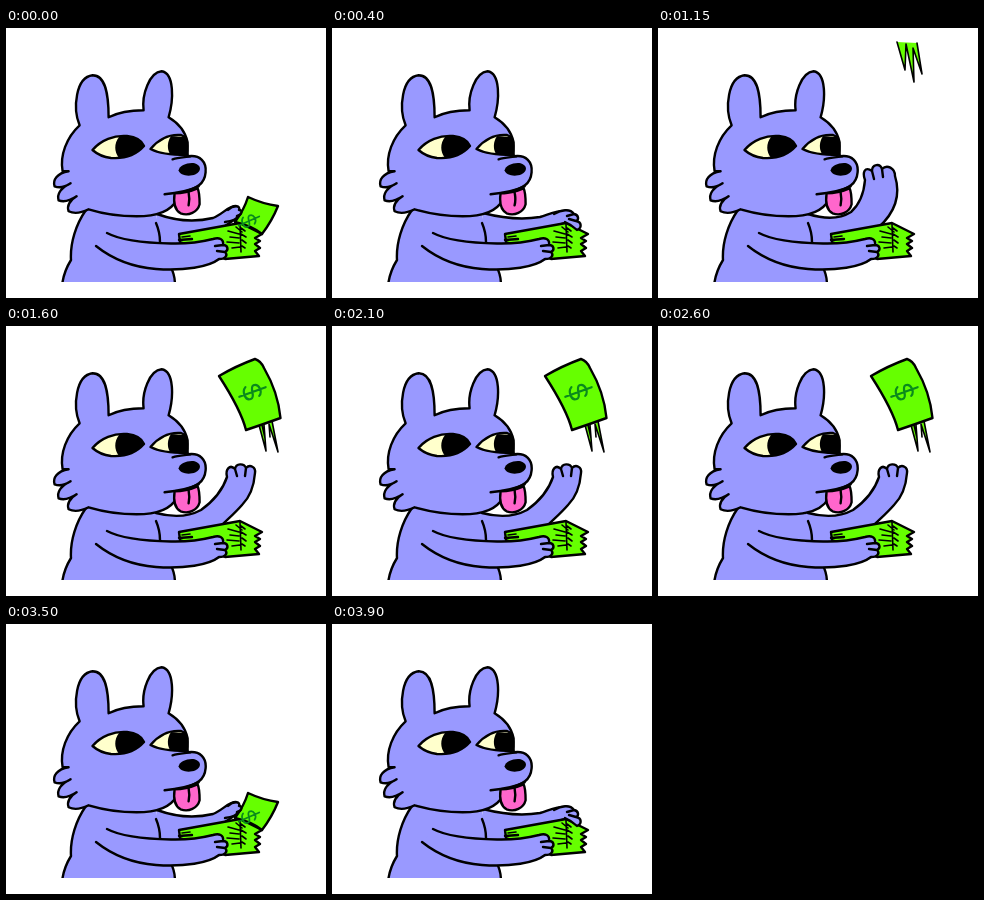
These frames come from a looping animation (320 by 270 pixels, 4 s). An HTML page:

```html
<!DOCTYPE html>
<html lang="en">
<head>
<meta charset="utf-8">
<title>Counting cash</title>
<style>
  html, body { margin: 0; width: 100%; height: 100%; overflow: hidden; background: #fff; }
  svg { display: block; width: 100vw; height: 100vh; }
  path { stroke: #000; stroke-width: 2.4; stroke-linecap: round; stroke-linejoin: round; fill: none; }
  .skin { fill: #99f; }
  .cash { fill: #6f0; }
  .eye { fill: #ffc; }
  .ink { fill: #000; }
  .bare { stroke: none; }
  .thin { stroke-width: 1.6; }
  .white { fill: #fff; }
  .sign { stroke: #0a8a1c; stroke-width: 2.2; }
</style>
</head>
<body>
<svg viewBox="0 0 320 270">
  <defs>
    <clipPath id="stage"><rect width="320" height="254"/></clipPath>
    <path id="dollar" class="sign" d="M6,-5C3,-10 -6,-9 -6,-3C-5,2 6,-2 6,4C6,10 -4,10 -7,5M0,-14L0,14"/>
  </defs>
  <g clip-path="url(#stage)">
    <!-- body -->
    <path class="skin bare" d="M80,182C70,196 64,215 65,232C60,240 57,248 56,258L169,258L165,236L154,214L150,184Z"/>
    <path d="M80,182C70,196 64,215 65,232C60,240 57,248 56,258M165,240C168,245 169,250 169,258"/>
    <!-- far arm -->
    <path id="armFill" class="skin bare"/>
    <path id="arm"/>
    <path d="M150,195C153,202 154,208 154,214"/>
    <path id="streaks" class="skin thin"/>
    <!-- head -->
    <g transform="translate(.6,.3)">
      <path class="skin" d="M73,97C66,80 69,49 86,47C99,47 102,66 102,89C112,84 125,82 137,82C135,66 143,44 155,43C168,45 167,72 162,89C172,95 179,104 181,114L181,128C194,126 200,134 199,144C198,156 190,160 176,164L170,172C165,181 155,188 130,188C110,188 95,185 82,181C76,184 68,186 62,183C60,178 63,172 70,168C64,172 57,174 52,172C50,165 56,159 64,155C58,159 53,160 48,158C46,152 50,145 62,143L56,143C53,127 60,109 73,97Z"/>
      <path d="M158,166C168,165 181,163 192,158M166,131C172,129 178,129 184,128"/>
      <path style="fill:#f6c" d="M168,165C167,172 167,181 174,185C182,188 191,184 193,176C193,170 193,164 191,160C184,163 176,165 168,165Z"/>
      <path d="M182,164C183,169 183,173 182,177"/>
      <path class="ink bare" d="M172,142C173,137 181,134 188,135C195,137 195,143 189,146C182,149 173,147 172,142Z"/>
    </g>
    <g id="open">
      <path class="eye" d="M86.5,122C95,112 108,107 121,108C130,109 136,113 138,118C130,127 118,131 105,130C97,129 91,126 86.5,122Z"/>
      <path class="ink bare" d="M113,109C108,115 108,124 113,130C123,129 132,125 138,118C134,110 123,107 113,109Z"/>
      <path class="eye" d="M144.5,121C152,112 163,106 175,107L179,109C182,116 182,122 180,127C167,127 154,126 144.5,121Z"/>
      <path class="ink bare" d="M165,108C161,114 161,121 164,126L180,127C182,121 182,115 179,109Z"/>
    </g>
    <path id="shut" d="M87,122C91,126 97,129 105,130C118,131 130,127 138,118M145,121C154,126 167,127 180,127"/>
    <!-- stack -->
    <path class="cash" d="M173,206L234,195L256,206L249,210L254,213L249,216L254,220L249,223L253,228L219,231L174,214Z"/>
    <path class="thin" d="M234,196L235,224M222,203L233,206M224,209L233,210M221,214L233,215M226,220L234,219M235,200L239,203M235,206L240,209M236,212L240,215M236,218L239,220M230,199L236,204"/>
    <path class="thin" d="M176,209L184,208"/>
    <!-- loose bill -->
    <path id="trail" class="cash thin"/>
    <g id="bill">
      <path class="cash" d="M213,50Q230,40 249,33Q255,35 258,42Q272,66 274.500,92Q258,98 240,104Q235,84 213,50Z"/>
      <use href="#dollar" transform="translate(246.500,66) rotate(70)"/>
    </g>
    <g id="pulled">
      <path class="cash" d="M242,169Q257,176 272,178Q266,193 256,206Q246,198 229,194Q238,182 242,169Z"/>
      <use href="#dollar" transform="translate(243,193) rotate(66) scale(.8)"/>
    </g>
    <path id="fingers" class="skin"/>
    <!-- near arm -->
    <path class="skin bare" d="M90,218C105,230 125,239 150,241C180,243 205,239 217,230C222,227 222,216 215,211L208,211C195,213 184,215 165,215C140,215 115,212 101,206Z"/>
    <path d="M90,218C105,230 125,239 150,241C178,243 203,239 213,231C220,231 222,227 219,224C223,222 222,217 217,217C218,211 213,209 207,211C195,214 184,216 165,215.500C140,215 116,213 101,205M219,224L211,223M217,217L209,218M173,212L186,211"/>
  </g>
</svg>
<script>
const el = id => document.getElementById(id);
const STEP = 50, CYCLE = 500, BLINK_LOOP = 2000;

const raised = "M150,187C165,191 182,191 195,184C209,174 217,163 221,151C219,143 224,138 229,143C230,137 238,137 240,142C244,138 250,141 249,147C248,160 243,172 236,179C229,187 222,193 215,200M229,143L231,150M240,142L239,150";

const poses = {
  pull: {
    arm: "M151,186C170,193 190,194 207,190C217,186 222,178 230,178L234,188L216,200",
    fingers: "M222,182C227,177 235,177 233,182C237,182 236,187 231,188C232,191 226,193 219,194",
    pulled: true
  },
  flick: {
    arm: raised,
    bill: [7, 50],
    trail: "M260,149L266,174L265,150M270,148L278,175L273,146"
  },
  fly: {
    arm: raised,
    bill: [0, 0],
    trail: "M253,99L260,125L258,99M256,99L259,112M263,98L272,126L266,95M263,98L264,111"
  },
  reach: {
    arm: "M150,186C166,191 182,191 193,184C202,176 206,164 207,152C204,144 207,138 214,143C214,136 222,135 224,141C229,136 237,140 237,148C242,164 240,182 220,200M214,143L216,151M224,141L225,149",
    trail: "M239,14L247,42L248,16L256,54L255,20L264,46L259,15"
  },
  lick: {
    arm: "M150,186C164,190 180,190 196,186C198,181 194,178 190,176C184,174 185,167 191,168C187,162 191,157 197,161C195,154 202,151 208,156C223,161 238,176 233,190L216,200M191,168L199,171M197,161L204,165"
  },
  swing: {
    arm: "M150,184L186,183C191,177 193,170 196,158C203,160 207,151 205,141L212,138C215,128 212,117 208,107C204,98 209,94 214,100L219,106C218,97 225,92 231,98C233,101 233,104 233,107C236,104 244,104 248,110C251,118 250,137 246,155C243,172 237,185 228,195M219,106L223,112M233,107L232,114",
    streaks: "M200,105L211,124Q203,119 200,105ZM196,119L208,137Q200,131 196,119Z"
  },
  lower: {
    arm: "M150,186C168,191 188,190 204,182C212,176 218,167 224,162C229,158 234,160 234,165C239,161 245,165 243,170C249,169 252,175 247,181C240,190 228,195 216,200M234,165L229,171M243,170L236,176"
  },
  rest: {
    arm: "M151,185C170,190 190,192 208,189C218,186 228,181 236,183L244,192L216,200",
    fingers: "M222,186C229,182 238,180 242,186C247,187 247,192 244,193C250,194 250,200 245,202C242,199 238,196 233,194M242,186L235,188M244,193L237,191"
  }
};
const order = ["pull", "flick", "fly", "reach", "lick", "lick", "swing", "lower", "rest", "rest"];

const put = (id, d) => el(id).setAttribute("d", d || "");
const show = (id, on) => el(id).setAttribute("visibility", on ? "visible" : "hidden");

function draw(ms) {
  const p = poses[order[Math.floor(ms % CYCLE / STEP)]];
  put("arm", p.arm);
  // Only the first stroke of an arm is its contour; close it inside the body.
  put("armFill", p.arm.split("M").slice(0, 2).join("M") + "L176,218L150,220Z");
  put("fingers", p.fingers);
  put("streaks", p.streaks);
  put("trail", p.trail);
  show("pulled", p.pulled);
  show("bill", p.bill);
  if (p.bill) el("bill").setAttribute("transform", `translate(${p.bill})`);
  const beat = ms % BLINK_LOOP;
  const blink = beat >= 950 && beat < 1050;
  show("open", !blink);
  show("shut", blink);
}

const start = performance.now();
function tick() {
  draw(performance.now() - start);
  requestAnimationFrame(tick);
}
draw(0);
requestAnimationFrame(tick);
</script>
</body>
</html>
```
